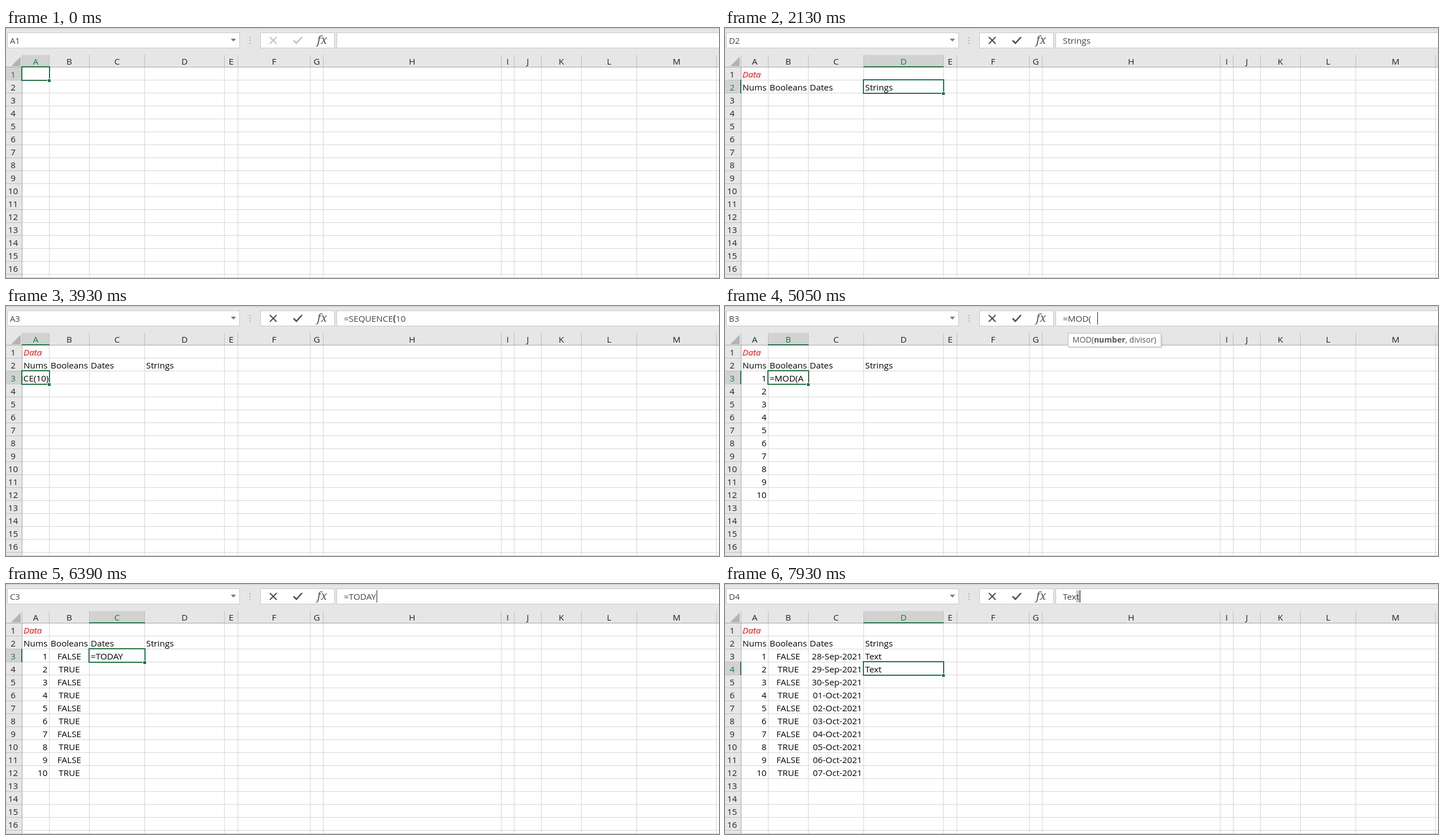
An HTML page with a canvas for the animation above (8 s loop, 1262 by 444 pixels).

```html
<!DOCTYPE html>
<html lang="en">
<head>
<meta charset="utf-8">
<title>Spreadsheet typing</title>
<style>
html, body { margin: 0; width: 100%; height: 100%; overflow: hidden; background: #e6e6e6; }
canvas { display: block; }
</style>
</head>
<body>
<canvas id="stage" width="1262" height="444"></canvas>
<script>
const W = 1262, H = 444, LOOP = 8000, STEP = 70.18;
const ctx = document.getElementById('stage').getContext('2d');
const FONT = '"Open Sans", "Noto Sans", sans-serif';
const GREEN = '#217346', BLUE = '#3f6fc4', BAR_X = 598, BAR_Y = 28;
const cols = [28, 76, 147, 245, 386, 410, 538, 561, 876, 899, 947, 1018, 1116, 1257, 1400];
const rowTop = r => 69 + 23 * (r - 1);

// Selection: step, column, row
const moves = [
  [0, 0, 1], [6, 0, 2], [11, 1, 2], [19, 2, 2], [25, 3, 2], [31, 3, 3], [35, 2, 3],
  [38, 1, 3], [40, 0, 3], [59, 1, 3], [79, 2, 3], [100, 3, 3], [109, 3, 4]
];

const date = i => i < 4 ? `${27 + i}-Sep-2021` : `0${i - 3}-Oct-2021`;

// counts: characters typed at each step from start; spill: result of the formula in ten rows
const entries = [
  { col: 0, row: 1, start: 1, end: 6, text: 'Data', counts: [2, 4] },
  { col: 0, row: 2, start: 7, end: 11, text: 'Nums', counts: [1, 2, 3, 4] },
  { col: 1, row: 2, start: 12, end: 19, text: 'Booleans', counts: [2, 4, 5, 7, 8] },
  { col: 2, row: 2, start: 21, end: 25, text: 'Dates', counts: [2, 3, 4, 5] },
  { col: 3, row: 2, start: 26, end: 31, text: 'Strings', counts: [2, 3, 5, 7] },
  { col: 0, row: 3, start: 47, end: 59, text: '=SEQUENCE(10)', counts: [1, 3, 4, 5, 7, 8, 9, 10, 12, 13],
    spill: String, align: 'right', args: ['rows', '[columns]', '[start]', '[step]'] },
  { col: 1, row: 3, start: 67, end: 79, text: '=MOD(A3#,2)=0', counts: [1, 2, 3, 4, 5, 6, 7, 9, 10, 11, 13],
    spill: i => i % 2 ? 'FALSE' : 'TRUE', align: 'center', args: ['number', 'divisor'] },
  { col: 2, row: 3, start: 88, end: 100, text: '=TODAY()+A3#', counts: [2, 4, 6, 6, 7, 8, 9, 10, 11, 12],
    spill: date, align: 'right', args: [] },
  { col: 3, row: 3, start: 103, end: 109, text: 'Text', counts: [1, 2, 3, 4] },
  { col: 3, row: 4, start: 112, end: 999, text: 'Text', counts: [2, 3], completes: true }
];

function setFont(size, style = '') {
  ctx.font = `${style} ${size}px ${FONT}`;
}
function rect(x, y, w, h, fill) {
  ctx.fillStyle = fill;
  ctx.fillRect(x, y, w, h);
}
function text(s, x, y, color = '#000', align = 'left') {
  ctx.fillStyle = color;
  ctx.textAlign = align;
  ctx.fillText(s, x, y);
}
function path(points, color, width) {
  ctx.beginPath();
  points.forEach(([x, y]) => ctx.lineTo(x, y));
  if (width) {
    ctx.strokeStyle = color;
    ctx.lineWidth = width;
    ctx.stroke();
  } else {
    ctx.fillStyle = color;
    ctx.fill();
  }
}
// Parts: [text, colour, style]
function rich(parts, x, y, size) {
  for (const [s, color, style] of parts) {
    setFont(size, style);
    text(s, x, y, color);
    x += ctx.measureText(s).width;
  }
}
function panel(x, w) {
  rect(x, 8, w, 28, '#c8c8c8');
  rect(x + 1, 9, w - 2, 26, '#fff');
}

const activeAt = step => entries.find(e => step >= e.start && step < e.end);

function typedAt(step) {
  const e = activeAt(step);
  return e ? e.text.slice(0, e.counts[Math.min(step - e.start, e.counts.length - 1)]) : '';
}

function selectionAt(step) {
  const i = moves.findLastIndex(m => m[0] <= step);
  const [from, col, row] = moves[i];
  const box = (c, r) => [cols[c], rowTop(r), cols[c + 1], rowTop(r + 1)];
  let edges = box(col, row);
  if (i && step === from) {
    const old = box(moves[i - 1][1], moves[i - 1][2]);
    edges = edges.map((v, k) => Math.round(old[k] + (v - old[k]) * 0.56));
  }
  return { col, row, edges };
}

function drawGrid(sel) {
  rect(0, 0, W, H, '#e6e6e6');
  rect(0, 0, W, 2, '#d6d6d6');
  rect(29, 70, W, H, '#fff');
  rect(cols[sel.col] + 1, 48, cols[sel.col + 1] - cols[sel.col] - 1, 21, '#d2d2d2');
  rect(0, rowTop(sel.row) + 1, 28, 22, '#d2d2d2');
  for (const x of cols) {
    rect(x, 48, 1, 21, '#bdbdbd');
    rect(x, 70, 1, H, '#d6d6d6');
  }
  for (let r = 1; r <= 17; r++) {
    const y = rowTop(r);
    rect(0, y, 28, 1, '#bebebe');
    rect(28, y, W, 1, '#d6d6d6');
  }
  rect(0, 69, W, 1, '#a6a6a6');
  rect(28, 69, 1, H, '#a6a6a6');
  rect(0, 443, W, 1, '#c6c6c6');
  path([[9, 68], [26, 51], [26, 68]], '#b3b3b3');

  setFont(15.3);
  for (let c = 0; c < 13; c++)
    text('ABCDEFGHIJKLM'[c], (cols[c] + cols[c + 1]) / 2 + 0.5, 65, c === sel.col ? GREEN : '#222', 'center');
  for (let r = 1; r <= 16; r++)
    text(r, 12.5, rowTop(r) + 19, r === sel.row ? GREEN : '#222', 'center');
}

function drawCell(s, col, row, align = 'left') {
  const left = cols[col], right = cols[col + 1], heading = row === 1;
  setFont(15.3, heading ? 'italic' : '');
  let x = { left: left + 3, center: (left + right) / 2 + 0.5, right: right - 2.5 }[align];
  const overflow = align === 'left' && ctx.measureText(s).width > right - left - 4;
  if (overflow) {
    align = 'right';
    x = right - 0.5;
  }
  ctx.save();
  ctx.beginPath();
  ctx.rect(left, rowTop(row), right - left + 1, 23);
  ctx.clip();
  text(s, x, rowTop(row) + 19, heading ? '#f00' : '#000', align);
  ctx.restore();
}

function drawCells(step) {
  for (const e of entries) {
    if (step < e.end) continue;
    if (!e.spill) drawCell(e.text, e.col, e.row);
    else for (let i = 1; i <= 10; i++) drawCell(e.spill(i), e.col, e.row + i - 1, e.align);
  }
}

function drawSelection([l, t, r, b]) {
  rect(l, 68, r - l + 1, 2, GREEN);
  rect(27, t, 2, b - t + 1, GREEN);
  ctx.strokeStyle = GREEN;
  ctx.lineWidth = 2;
  ctx.strokeRect(l, t, r - l + 1, b - t + 1);
  rect(r - 3, b - 2, 7, 7, '#fff');
  rect(r - 2, b - 1, 5, 5, GREEN);
}

function drawReference() {
  const x = cols[0], y = rowTop(3), w = cols[1] - x, h = 230;
  rect(x, y, w, h, 'rgba(63,111,196,.1)');
  ctx.strokeStyle = BLUE;
  ctx.lineWidth = 2;
  ctx.strokeRect(x + 1, y + 1, w - 1, h - 1);
}

function drawBar(sel, editing) {
  panel(2, 412);
  panel(450, 132);
  panel(585, 700);
  setFont(14.8);
  text('ABCD'[sel.col] + sel.row, 7, BAR_Y, '#444');
  path([[398, 19], [407, 19], [402.5, 24]], '#777');
  for (const y of [16, 21, 26]) rect(431, y, 2, 2, '#ababab');
  const ink = editing ? '#505050' : '#c1c1c1';
  path([[467, 16], [479, 28]], ink, 2.2);
  path([[479, 16], [467, 28]], ink, 2.2);
  path([[509, 22], [514, 27], [524, 16]], ink, 2.6);
  ctx.font = 'italic 20px "Noto Serif", "Liberation Serif", serif';
  text('fx', 559.5, 28, '#555', 'center');
}

function drawFormula(step, entry, typed) {
  let shown = typedAt(step - 1);
  if (entry && entry.completes) shown = entry.text;
  setFont(15.3);
  const width = s => ctx.measureText(s).width;
  if (entry && entry.completes) {
    const from = BAR_X + width(typed);
    rect(from, 11, BAR_X + width(shown) - from + 1, 22, '#c8c8c8');
  }
  if (entry && typed.length < entry.text.length) {
    const end = entry.completes ? shown : typed;
    rect(Math.round(BAR_X + width(end) + 1), 11, 1, 22, '#222');
  }
  const closing = typed.endsWith(')') && !shown.endsWith(')');
  const parts = shown.split(/(A3#|\()/).map(s => [
    s, s === 'A3#' ? BLUE : '#444', s === '(' && closing ? 'bold' : ''
  ]);
  rich(parts, BAR_X, BAR_Y, 15.3);
}

function drawTooltip(entry, typed) {
  if (!typed.includes('(') || typed.includes(')')) return;
  const current = typed.split(',').length - 1;
  const parts = [[entry.text.slice(1, entry.text.indexOf('(') + 1), '#555', '']];
  entry.args.forEach((arg, i) => {
    if (i) parts.push([', ', '#555', '']);
    parts.push([arg, '#555', i === current ? 'bold' : '']);
  });
  parts.push([')', '#555', '']);
  const width = parts.reduce((sum, [s, , style]) => {
    setFont(14, style);
    return sum + ctx.measureText(s).width;
  }, 17);
  rect(609, 51, width, 24, 'rgba(0,0,0,.1)');
  rect(607, 48, width, 25, '#bdbdbd');
  rect(608, 49, width - 2, 23, '#fff');
  rich(parts, 615, 65, 14);
}

function draw(now) {
  const step = Math.floor((now % LOOP + 11) / STEP);
  const sel = selectionAt(step), entry = activeAt(step), typed = typedAt(step);
  drawGrid(sel);
  drawCells(step);
  if (typed.includes('A3#')) drawReference();
  if (entry) drawCell(entry.completes ? entry.text : typed, entry.col, entry.row);
  drawSelection(sel.edges);
  drawBar(sel, entry);
  drawFormula(step, entry, typed);
  if (entry) drawTooltip(entry, typed);
  requestAnimationFrame(draw);
}
requestAnimationFrame(draw);
</script>
</body>
</html>
```
